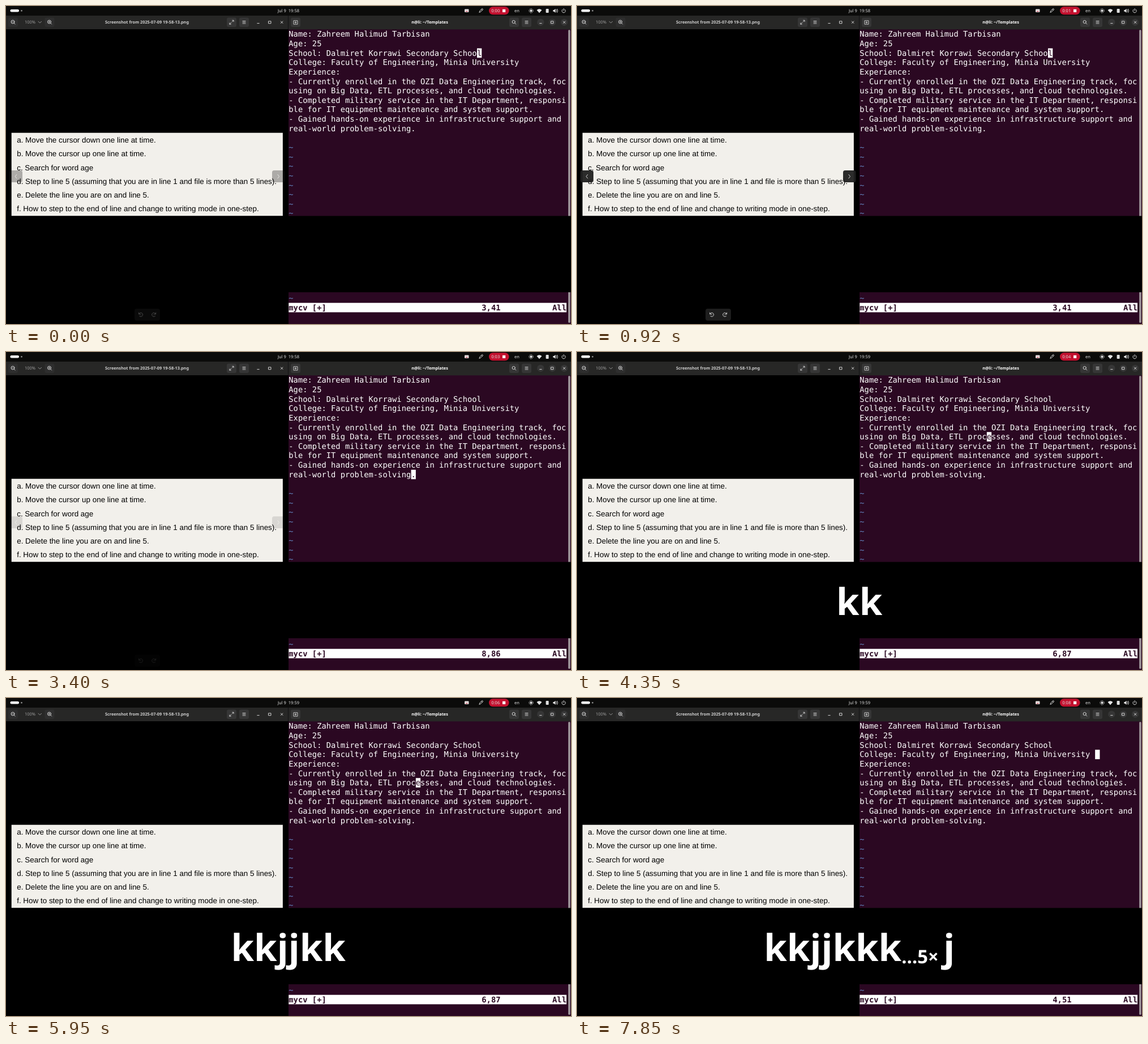
Write an HTML page that moves like this. It is 998x561 px and loops after 8 s.

```html
<!DOCTYPE html>
<html lang="en">
<head>
<meta charset="utf-8">
<title>Editor practice</title>
<style>
  html, body { margin: 0; width: 100%; height: 100%; overflow: hidden; background: #000; }
  svg { display: block; width: 100vw; height: 100vh; }
  text { white-space: pre; text-rendering: geometricPrecision; }
  .ui { font: 500 7.5px "Noto Sans", "Open Sans", sans-serif; fill: #dedede; }
  .title { font-size: 7.32px; font-weight: 700; text-anchor: middle; }
  .term { font: 13.815px "DejaVu Sans Mono", monospace; fill: #fff; }
  .bold { font-weight: 700; }
  .dark { fill: #2b0822; }
  .tilde { fill: #6385c0; }
  .task { font: 13.43px "Liberation Sans", Arial, sans-serif; fill: #000; }
  .keys { font: 700 65.5px "Noto Sans", "Open Sans", sans-serif; fill: #fff; text-anchor: middle; }
  .sub { font-size: .5em; text-decoration-thickness: 1.6px; }
  .line { fill: none; stroke: #d6d6d6; stroke-width: 1; stroke-linecap: round; stroke-linejoin: round; }
  .btn { fill: #363636; }
  .float { fill: #202020; fill-opacity: .95; }
</style>
</head>
<body>
<svg viewBox="0 0 998 561" preserveAspectRatio="none">
  <rect width="998" height="561"/>

  <!-- top panel -->
  <rect width="998" height="17" fill="#0b0b0a"/>
  <rect x="7.5" y="6" width="15.5" height="4.4" rx="2.2" fill="#fff"/>
  <circle cx="27.5" cy="8.3" r="1.4" fill="#8b8b8b"/>
  <text class="ui" id="clock" x="499" y="10.8" text-anchor="middle"></text>
  <rect x="810" y="5.5" width="7.5" height="5.5" rx="1" fill="#e4dcdc"/>
  <path d="M812 9.5h3.5" stroke="#c03048"/>
  <path class="line" d="M836 11l1-2.6 4.2-4 1.6 1.6-4.2 4zM839.8 6l1.6 1.6" stroke-width=".8"/>
  <rect x="853" y="1.2" width="35.5" height="14" rx="7" fill="#c3112f"/>
  <text class="ui" id="timer" x="857.3" y="10.9" fill="#fff"></text>
  <rect x="877" y="5.8" width="5.2" height="5.2" fill="#fff"/>
  <text class="ui" x="898" y="10.8">en</text>
  <circle cx="927.5" cy="8.4" r="2.1" fill="#e0e0e0"/>
  <circle class="line" cx="927.5" cy="8.4" r="3.6" stroke-dasharray="1 1.83"/>
  <path d="M937.5 7.2q4.5-4 9 0l-4.5 5z" fill="#e6e6e6"/>
  <rect x="953.6" y="5" width="5" height="7" rx="1" fill="#e0e0e0"/>
  <path d="M966.3 7h1.8l2.4-2.2v7.2l-2.4-2.2h-1.8z" fill="#e6e6e6"/>
  <path class="line" d="M972 6.5q1.4 1.9 0 3.8M973.6 5.3q2.2 3.1 0 6.2" stroke-width=".8"/>
  <path class="line" d="M983.2 6a3.2 3.2 0 1 0 3.8 0M985.1 4.7v3.4" stroke-width=".9"/>

  <!-- image viewer -->
  <rect y="17" width="498.5" height="24" fill="#272726"/>
  <g class="btn">
    <rect x="4" y="20.5" width="17" height="16.5" rx="3" opacity=".5"/>
    <rect x="68.5" y="20.5" width="17" height="16.5" rx="3" opacity=".5"/>
    <rect x="390" y="20.5" width="17" height="16.5" rx="3"/>
    <rect x="412" y="20.5" width="17" height="16.5" rx="3"/>
  </g>
  <g class="line">
    <g id="zoom"><circle cx="12" cy="28" r="3"/><path d="M14.3 30.3l1.8 1.8M10.8 28h2.4" stroke-width=".9"/></g>
    <use href="#zoom" x="64.5"/>
    <path d="M76.5 26.8v2.4" stroke-width=".9"/>
    <path d="M57 27.4l2.8 2.4 2.8-2.4" stroke="#929292"/>
    <path d="M399.3 28l2.7-2.7M399.7 25.2h2.4v2.4M397.7 29.4l-2.7 2.7M397.3 32.2h-2.4v-2.4" stroke-width=".9"/>
    <path id="menu" d="M418 26.5h5M418 28.7h5M418 30.9h5" stroke-width=".9"/>
    <g id="window"><path d="M443.8 30.6h3.4"/><rect x="464" y="26.8" width="4" height="4"/><path d="M485.4 26.9l3.6 3.6M489 26.9l-3.6 3.6"/></g>
  </g>
  <text class="ui" x="33" y="31.3" style="fill:#9a9a9a">100%</text>
  <text class="ui title" x="249" y="31.2" style="fill:#cfcfcf">Screenshot from 2025-07-09 19-58-13.png</text>
  <rect x="9.7" y="223.7" width="479.2" height="146.8" fill="#f2f0eb"/>
  <g id="tasks"></g>
  <g id="controls">
    <rect class="float" x="6" y="290" width="23" height="21" rx="3.5"/>
    <rect class="float" x="470" y="290" width="22.5" height="21" rx="3.5"/>
    <rect class="float" x="227" y="534" width="45" height="21" rx="4"/>
    <g class="line">
      <path d="M18.8 297.4l-2.6 3.3 2.6 3.3M479.9 297.4l2.6 3.3-2.6 3.3"/>
      <path id="turn" d="M235 543.2a3.4 3.4 0 1 1 .6 3.7M234.6 541v2.6h2.6M238.2 544.8h.2"/>
      <use href="#turn" transform="translate(499.2 0) scale(-1 1)"/>
    </g>
  </g>

  <!-- terminal -->
  <rect x="499" y="41" width="499" height="520" fill="#2b0822"/>
  <rect x="499" y="17" width="499" height="24.3" fill="#272726"/>
  <g class="btn">
    <rect x="503" y="20.5" width="17" height="16.5" rx="3"/>
    <rect x="889" y="20.5" width="17" height="16.5" rx="3"/>
    <rect x="911" y="20.5" width="17" height="16.5" rx="3"/>
    <circle cx="944.3" cy="28.7" r="6.2"/><circle cx="965" cy="28.7" r="6.2"/><circle cx="986" cy="28.7" r="6.2"/>
  </g>
  <g class="line">
    <path d="M508 31.8v-6h7v6zM511.5 27.5v3M510 29h3" stroke-width=".9"/>
    <circle cx="896.7" cy="28" r="2.6"/><path d="M898.7 30l2 2"/>
    <use href="#menu" x="499"/>
    <use href="#window" x="498.9"/>
  </g>
  <text class="ui title" x="748.5" y="31.2" style="fill:#fff">n@li: ~/Templates</text>
  <rect x="993.2" y="42" width="3.4" height="517" rx="1.7" fill="#a49da1"/>
  <g id="screen"></g>
  <rect id="cursor" width="8.3" height="16.6" fill="#fff"/>
  <text id="cursorChar" class="term dark"></text>
  <rect x="499.3" y="523.7" width="490.7" height="16.6" fill="#fff"/>
  <g id="status"></g>

  <!-- key display -->
  <rect y="370.4" width="998" height="134.6"/>
  <text class="keys" x="498.7" y="463.5"><tspan id="head"></tspan><tspan id="repeat" class="sub" dy="4.5"></tspan><tspan id="tail" dy="-4.5"></tspan></text>
</svg>
<script>
const $ = id => document.getElementById(id);
const LOOP = 8000;
const CELL_W = 8.317, CELL_H = 16.634, LEFT = 499.3, TOP = 41.4;

const tasks = [
  'a. Move the cursor down one line at time.',
  'b. Move the cursor up one line at time.',
  'c. Search for word age',
  'd. Step to line 5 (assuming that you are in line 1 and file is more than 5 lines).',
  'e. Delete the line you are on and line 5.',
  'f. How to step to the end of line and change to writing mode in one-step.'
];
const rows = [
  'Name: Zahreem Halimud Tarbisan',
  'Age: 25',
  'School: Dalmiret Korrawi Secondary School',
  'College: Faculty of Engineering, Minia University',
  'Experience:',
  '- Currently enrolled in the OZI Data Engineering track, foc',
  'using on Big Data, ETL processes, and cloud technologies.',
  '- Completed military service in the IT Department, responsi',
  'ble for IT equipment maintenance and system support.',
  '- Gained hands-on experience in infrastructure support and',
  'real-world problem-solving.'
];

// buffer line -> screen row, screen column, column shown in the ruler
const spots = {
  3: [2, 40, 41], 4: [3, 50, 51], 5: [4, 10, 11],
  6: [6, 27, 87], 7: [8, 27, 87], 8: [10, 26, 86]
};
// time, buffer line, keys, repeat label, keys after it
const steps = [
  [0, 3, ''], [1190, 8, ''],
  [3680, 7, 'k'], [4080, 6, 'kk'], [4660, 7, 'kkj'], [5070, 8, 'kkjj'],
  [5470, 7, 'kkjjk'], [5920, 6, 'kkjjkk'], [6320, 5, 'kkjjkkk'],
  [6760, 4, 'kkjjkkk', '…4×'], [7170, 3, 'kkjjkkk', '…5×'],
  [7650, 4, 'kkjjkkk', '…5× ', 'j']
];
const ticks = [800, 1770, 2750, 3740, 4760, 5750, 6760, 7750];

function addText(parent, x, y, cls, content) {
  const el = document.createElementNS('http://www.w3.org/2000/svg', 'text');
  el.setAttribute('x', x);
  el.setAttribute('y', y);
  el.setAttribute('class', cls);
  el.textContent = content;
  return parent.appendChild(el);
}
const cellX = col => LEFT + col * CELL_W;
const rowY = row => TOP + row * CELL_H;
const baseY = row => rowY(row) + 13;
const place = (el, x, y) => { el.setAttribute('x', x); el.setAttribute('y', y); };

tasks.forEach((task, i) => addText($('tasks'), 19.2, 241.1 + i * 24.2, 'task', task));
rows.forEach((row, i) => addText($('screen'), LEFT, baseY(i), 'term', row));
for (let row = 12; row < 29; row++) addText($('screen'), LEFT, baseY(row), 'term tilde', '~');
const statusText = (col, content) => addText($('status'), cellX(col), baseY(29), 'term bold dark', content);
statusText(0, 'mycv [+]');
statusText(56, 'All');
const ruler = statusText(41, '');

const easeOut = (t, start, length) => {
  const p = Math.min(1, Math.max(0, (t - start) / length));
  return 1 - (1 - p) ** 3;
};

let shown;
function showStep(step) {
  if (step === shown) return;
  shown = step;
  const [, line, keys, repeat = '', tail = ''] = step;
  const [row, col, rulerCol] = spots[line];
  place($('cursor'), cellX(col), rowY(row));
  place($('cursorChar'), cellX(col), baseY(row));
  $('cursorChar').textContent = rows[row][col] || '';
  ruler.textContent = line + ',' + rulerCol;
  $('head').textContent = keys;
  $('repeat').textContent = repeat;
  $('repeat').style.textDecorationLine = repeat && !tail ? 'underline' : 'none';
  $('tail').textContent = tail;
}

function draw(now) {
  const t = now % LOOP;
  showStep(steps.filter(step => step[0] <= t).pop());
  $('timer').textContent = '0:0' + ticks.filter(tick => tick <= t).length;
  $('clock').textContent = 'Jul 9  19:5' + (t < 4080 ? 8 : 9);
  $('controls').style.opacity = easeOut(t, -130, 1000) - easeOut(t, 2900, 1000);
  requestAnimationFrame(draw);
}
draw(0);
</script>
</body>
</html>
```
